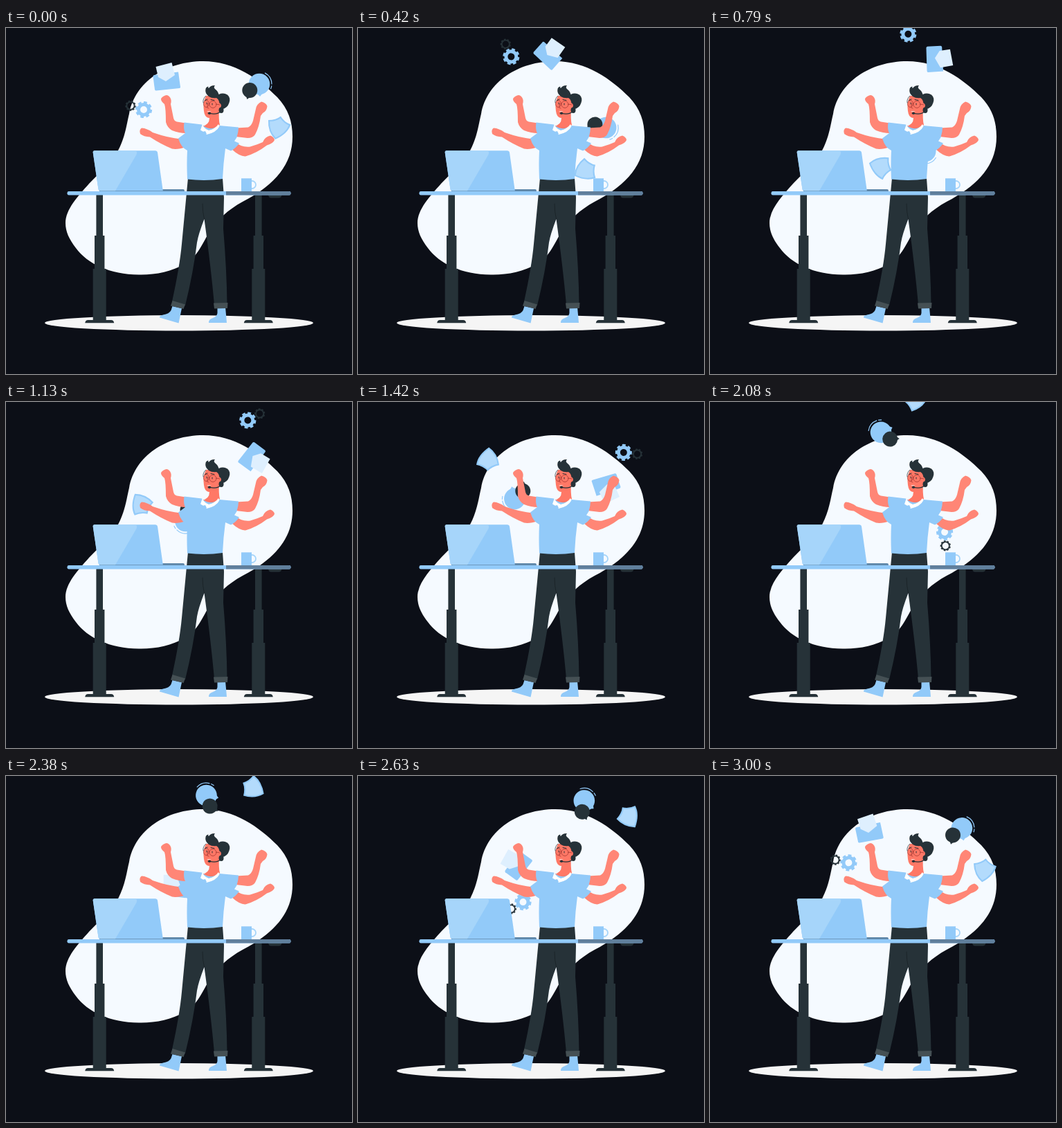
An HTML page that plays this animation: 500x500 px, repeating every 3.04 s.

```html
<!DOCTYPE html>
<html lang="en">
<head>
<meta charset="utf-8">
<title>Multitasking support agent</title>
<style>
  html, body { margin: 0; width: 100%; height: 100%; overflow: hidden; background: #0c0f17; }
  svg { display: block; width: 100vw; height: 100vh; }
  .blue { fill: #92caf9; }
  .light { fill: #a6d5fa; }
  .pale { fill: #deeffe; }
  .dark { fill: #263238; }
  .skin { fill: #ff8676; }
  .face { fill: #ff7866; }
  .line { fill: none; stroke-linecap: round; }
  .gear { fill: none; }
</style>
</head>
<body>
<svg viewBox="0 0 500 500">
  <path fill="#f5faff" d="M285 48C330 48 366 74 392 100C408 117 414 135 414 157C414 196 390 226 342 251C320 263 306 277 295 293C284 310 278 330 258 341C240 352 215 357 192 356.500C150 356 118 341 101 318C91 305 86 294 86 282C86 262 104 243 120 225C132 212 148 200 158 184C172 162 174 140 178 124C186 78 232 48 285 48Z"/>
  <ellipse cx="250" cy="426.300" rx="194" ry="11.200" fill="#f5f5f5"/>

  <g id="orbit">
    <!-- gears -->
    <g class="gear" stroke="#92caf9">
      <circle cx="199" cy="118" r="7.500" stroke-width="5"/>
      <circle cx="199" cy="118" r="10.700" stroke-width="2.800" pathLength="16" stroke-dasharray="1.15 .85"/>
    </g>
    <g class="gear" stroke="#263238">
      <circle cx="180" cy="112.300" r="5.600" stroke-width="1.900"/>
      <circle cx="180" cy="112.300" r="6.900" stroke-width="1.500" pathLength="18" stroke-dasharray="1.1 .9"/>
    </g>
    <!-- envelope -->
    <path class="blue" d="M212.500 70Q212.500 68.500 214 68L249 63.500L252 85.500Q252 86.500 250.500 87L217 90.500Q215.500 90.500 215 89Z"/>
    <path class="pale" d="M216.500 56L239.500 50L244 68L231 77L220 71Z"/>
    <!-- speech bubbles -->
    <circle class="blue" cx="366" cy="81" r="15.300"/>
    <path class="blue" d="M362 94L367 99L371 94Z"/>
    <g id="arcs" class="line" stroke="#92caf9" stroke-width="1.200"></g>
    <circle class="dark" cx="352.300" cy="90" r="11"/>
    <path class="dark" d="M347 98L348.300 103L354 99Z"/>
    <!-- shield -->
    <path class="blue" d="M379 133Q390 133 397 127.500Q402 136 411.500 139.500Q407 153 389 161Q378 150 379 133Z"/>
    <path fill="#b3dbfc" d="M381.200 135Q390 134.800 396.500 130.500Q401.500 137.500 408.700 140.700Q404 152 389.600 158.500Q380.500 149 381.200 135Z"/>
  </g>

  <!-- arms -->
  <g class="skin">
    <path d="M260 137.500L247 135.500Q243 134.500 242 130L238 110Q240 103 236 99Q233 96 230 97.500Q224 100 224 103Q224 106 229 110Q231 116 231 136Q233 144 240 148Q250 152 260 152Z"/>
    <path d="M253 160.500Q235 159 212 151Q204 145 196 144.500Q192 147 194 153Q199 157 208 157.500Q224 168 240 174.500Q248 176 260 172Z"/>
    <path d="M333 144.500L350 143.500Q355 141 357 134L361 117Q362 110 369 106.500Q376 108 377.500 113Q377 120 371 123L368 127Q366 143 360 154Q357 159 349 159L332 157Z"/>
    <path d="M330 164Q340 173 353 171.500Q364 168 371 165Q374 157 382 155.500Q388 158 388 162Q386 167 377 169.500Q362 181 346 185.500Q338 186 326 175Z"/>
  </g>

  <!-- feet and trousers -->
  <path class="blue" d="M240.500 402L254 405L249.500 426.500L222 418.500Q221.500 415.500 227 414.500Q236 413 238.500 408Z"/>
  <path class="blue" d="M305.500 403H317L319 426H293Q292.500 421 299 419Q305 417 305.500 412Z"/>
  <path class="dark" d="M263 217Q288 221 313 217L315 245L314 290Q319 350 319.500 399L301 400Q296 345 286.500 276Q278 298 276 310Q271 352 259 401L240 395Q251 345 254 312Z"/>
  <path class="line" d="M284 254Q284 266 286.500 276" stroke="#171f23" stroke-width=".7"/>
  <g fill="#455054">
    <path d="M240.500 394L259 399.500L256.500 406L238 401.500Z"/>
    <path d="M300 397.500L320.500 397L320 405L301 405.500Z"/>
  </g>

  <!-- neck and shirt -->
  <path class="face" d="M293 124L308 117Q307 132 309 140L296 150L283 142Q294 140 294 130Z"/>
  <path class="blue" d="M257.500 136.500L283 139.500Q294 150 308 141L336 143.500Q336 150 333.500 158L330 163.500L337 166.500Q332 174 325 177.500L317 174Q314 196 313 218Q288 221.500 262 218.500Q261 196 262 177Q253 173 249 159.500L259 152Q256 146 257.500 136.500Z"/>
  <path fill="#fff" d="M284 138.500L281 147.500L286 150.500L290 154Q304 151 308.500 142L307 139Q302 146 293 148Q285 145 284 138.500Z"/>
  <path class="blue" d="M284 150L288 149L290 153L285 155Z"/>

  <!-- head -->
  <path class="face" d="M289 98Q284 108 286 120Q287 129 293 130Q301 130 306 123L316 114Q316 104 306 98Z"/>
  <path class="dark" d="M288.500 88Q289 85 292.500 84.500Q291.500 86 293 87Q296 82.500 302 83Q299 86 303 89Q306 91 307.500 96Q314 93 320 96.500Q325 101 322.500 108Q320 116 312 117.500L308.500 112Q309 104 304 101Q298 102 293 99Q287 94 288.500 88Z"/>
  <path class="face" d="M306 109Q310 107 311 112Q310 118 306 116Z"/>
  <g class="line" stroke="#a83a35" stroke-width=".8">
    <ellipse cx="289.500" cy="109.500" rx="4" ry="5"/>
    <circle cx="299" cy="110.500" r="5"/>
    <path d="M304 110L309 111M292 109L290.500 115L293 116"/>
  </g>
  <g class="line" stroke="#263238" stroke-width="1">
    <path d="M287.500 104.500L291 103M296 103.500L301 104.500M290.200 108V110M298 109V111"/>
    <path d="M289 98Q284 102 285 108" stroke-width=".7"/>
    <path d="M311 120Q305 126 294 123.200" stroke-width="1.200"/>
  </g>
  <path d="M290 120.500Q293 122 297 120Z" fill="#fff"/>
  <ellipse class="dark" cx="311" cy="118.800" rx="3.500" ry="4.200"/>
  <ellipse class="dark" cx="294" cy="123.200" rx="2.200" ry="1.800"/>

  <!-- desk -->
  <g id="legs" class="dark"></g>
  <path class="dark" d="M379 241H398.500Q398 245.500 394 245.500H383Q379.500 245.500 379 241Z"/>
  <rect class="blue" x="88.500" y="236" width="323" height="5.500" rx="2.300"/>
  <path fill="#607f9c" d="M318 236H409.200Q411.500 236 411.500 238.700Q411.500 241.500 409.200 241.500H318Z"/>
  <path fill="#6189ab" d="M135 236V234.500L225 233H256Q258 233 258 236Z"/>
  <path class="blue" d="M128 177.300H215.500Q218.500 177.300 219 180L226.800 235.300H136Q134 235.300 133.500 233L125.700 180Q125.500 177.300 128 177.300Z"/>
  <path class="light" d="M128 177.300H186Q190.500 178 188.500 183L158 235.300H136Q134 235.300 133.500 233L125.700 180Q125.500 177.300 128 177.300Z"/>
  <circle class="line" cx="355.500" cy="226.500" r="5.500" stroke="#a6d5fa" stroke-width="1.800"/>
  <path class="blue" d="M340 217.300H355V236H340Z"/>
</svg>
<script>
  const LOOP = 3040, STEPS = 73, STEP_MS = 1000 / 24;
  const byId = id => document.getElementById(id);

  const leg = x => `<path d="M${x - 4.8} 241h9.600v59h2.400v48h2.300v74h7q4 0 4.500 4.300h-42q.500-4.300 4.500-4.300h7v-74h2.300v-48h2.400z"/>`;
  byId('legs').innerHTML = leg(135.2) + leg(364.8);

  function arc(cx, cy, r, from, to) {
    const at = deg => {
      const a = deg * Math.PI / 180;
      return `${cx + r * Math.cos(a)} ${cy + r * Math.sin(a)}`;
    };
    return `<path d="M${at(from)}A${r} ${r} 0 0 1 ${at(to)}"/>`;
  }
  byId('arcs').innerHTML = arc(366, 81, 18, -62, 0) + arc(366, 81, 18, 9, 22);

  // One turn per loop in 24 fps steps, slowing slightly towards the end.
  function draw(time) {
    const step = Math.floor((time % LOOP + 4.9) / STEP_MS) % STEPS;
    const u = step / STEPS;
    const angle = 360 * u + 33 * u ** 3 * (1 - u);
    byId('orbit').setAttribute('transform', `rotate(${angle} 293.500 104)`);
  }

  const start = performance.now();
  function tick() {
    draw(performance.now() - start);
    requestAnimationFrame(tick);
  }
  draw(0);
  requestAnimationFrame(tick);
</script>
</body>
</html>
```
